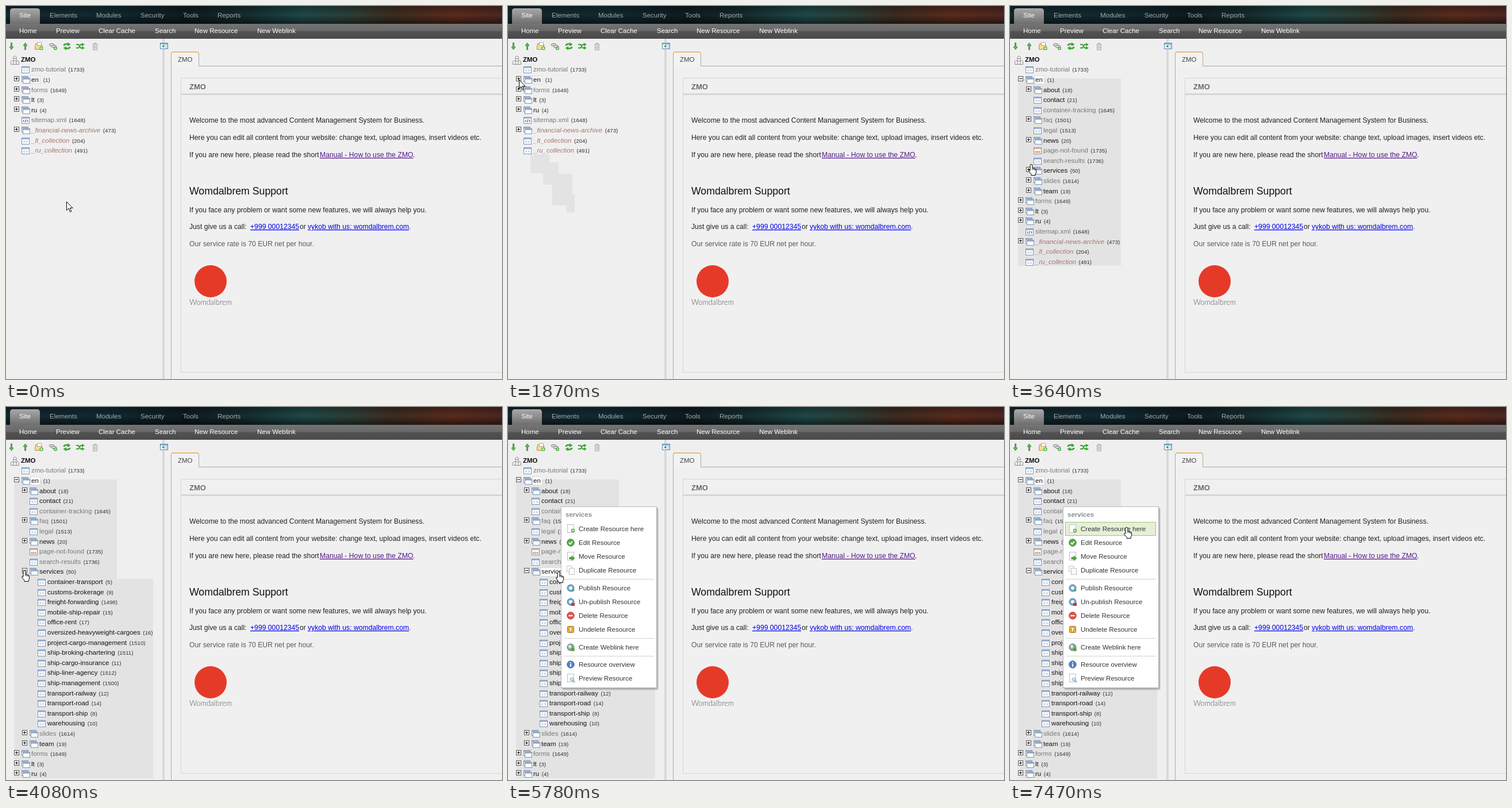
Recreate the animation shown at these times as an HTML page. Size 863 px wide and 649 px high, loop 8000 ms.

```html
<!DOCTYPE html>
<html lang="en">
<head>
<meta charset="utf-8">
<title>Site manager</title>
<style>
  html, body { margin: 0; width: 100%; height: 100%; overflow: hidden; background: #f0f0f0; }
  svg { display: block; font-family: "Liberation Sans", Arial, sans-serif; }
  text { white-space: pre; }
</style>
</head>
<body>
<svg id="stage" width="863" height="649" viewBox="0 0 863 649"></svg>
<script>
const LOOP = 8000, PITCH = 17.6, GHOST = '#e3e3e3';
const svg = document.getElementById('stage');

const rect = (x, y, w, h, fill, stroke = 'none', more = '') =>
  `<rect x="${x}" y="${y}" width="${w}" height="${h}" fill="${fill}" stroke="${stroke}" ${more}/>`;
const path = (d, fill = 'none', stroke = 'none', w = 1) =>
  `<path d="${d}" fill="${fill}" stroke="${stroke}" stroke-width="${w}"/>`;
const disc = (x, y, r, fill, stroke = 'none') =>
  `<circle cx="${x}" cy="${y}" r="${r}" fill="${fill}" stroke="${stroke}"/>`;
const text = (x, y, s, fill, size = 11.5, more = '') =>
  `<text x="${x}" y="${y}" fill="${fill}" font-size="${size}" ${more}>${s}</text>`;
const at = (x, y, s, id = '') => `<g ${id && `id="${id}"`} transform="translate(${x} ${y})">${s}</g>`;
const bold = 'font-weight="bold"';
const gradient = (id, dir, stops) => `<linearGradient id="${id}" x2="${dir === 'x' ? 1 : 0}" y2="${dir === 'y' ? 1 : 0}">` +
  stops.map(([o, c, a = 1]) => `<stop offset="${o}" stop-color="${c}" stop-opacity="${a}"/>`).join('') + '</linearGradient>';

// ---- Page frame ----
function header() {
  const tabs = { Elements: 76, Modules: 157, Security: 234, Tools: 308, Reports: 368 };
  const links = { Home: 23, Preview: 87, 'Clear Cache': 161, Search: 259, 'New Resource': 328, 'New Weblink': 437 };
  return '<defs>' +
    gradient('sky', 'x', [[0, '#14262d'], [.2, '#102a31'], [.36, '#0e1b20'], [.48, '#152c2e'], [.6, '#1f4848'],
      [.7, '#2d3d35'], [.78, '#3c2c20'], [.9, '#5a2b1c'], [1, '#4d2722']]) +
    gradient('dusk', 'y', [[0, '#000', .3], [.5, '#000', 0], [1, '#000', .5]]) +
    gradient('tab', 'y', [[0, '#a8a8a8'], [1, '#6f6f6f']]) +
    gradient('bar', 'y', [[0, '#747474'], [.46, '#686868'], [.52, '#525252'], [1, '#4a4a4a']]) +
    '</defs>' +
    rect(0, 0, 863, 31, 'url(#sky)') + rect(0, 0, 863, 31, 'url(#dusk)') +
    path('M7 31V9q0-5 5-5H54q5 0 5 5V31Z', 'url(#tab)') +
    rect(0, 31, 863, 26, 'url(#bar)') +
    text(23, 20, 'Site', '#fff') +
    Object.entries(tabs).map(([s, x]) => text(x, 20, s, '#a3a9ab')).join('') +
    Object.entries(links).map(([s, x]) => text(x, 47, s, '#fff')).join('');
}

function toolbar() {
  const green = '#3fa535', edge = '#2b7d25';
  const down = 'M3 0H5V7H7.5L4 12 .5 7H3Z';
  return at(5.5, 64, path(down, '#5cc04c', edge, .8)) +
    `<g transform="translate(29.5 76) scale(1 -1)">${path(down, '#5cc04c', edge, .8)}</g>` +
    at(50, 63, path('M1.5 5.5V2.5H6L7.5 4.5H12.5V12.5H.5V6Z', '#f4dc8c', '#b8943a') +
      rect(4.5, .5, 7, 5, '#fff', '#aaa') + disc(11.5, 10.5, 3.3, '#5db54a') +
      path('M11.5 8.5v4M9.5 10.5h4', 'none', '#fff', 1.2)) +
    at(75, 64, rect(.5, 1.5, 8, 4, '#ddd', '#777', 'rx="2"') + rect(4.5, 4.5, 8, 4, '#ddd', '#777', 'rx="2"') +
      disc(11, 9.5, 3, green) + path('M11 7.7v3.6M9.2 9.5h3.6', 'none', '#fff')) +
    at(99, 63, path('M1.5 6Q3 2 9 3.5M12.5 8Q11 12 5 10.5', 'none', green, 2.6) +
      path('M8 0L13.5 4 8 7ZM6 14L.5 10 6 7Z', green)) +
    at(122, 64, path('M0 3H4L8 9H11M0 9H4L8 3H11', 'none', green, 2.2) +
      path('M10 0L15 3 10 6ZM10 6L15 9 10 12Z', green)) +
    at(150, 63, path('M.5 3.5H9.5M3.5 3V1.5H6.5V3M1.5 3.5V13.5H8.5V3.5M3.8 5.5v6M6.2 5.5v6', '#e6e6e6', '#aaa'));
}

function mainArea() {
  const line = (y, s, fill = '#222') => text(319, y, s, fill, 12.2);
  const link = (x, y, s, fill = '#00e') => text(x, y, s, fill, 12.2, 'text-decoration="underline"');
  return rect(272, 57, 4, 592, '#d9d9d9') +
    at(268, 64, rect(.5, .5, 13, 10, '#fff', '#5b86bd') + rect(1, 1, 12, 2, '#8db3e0') +
      rect(9, 3, 4, 7, '#c8daf0') + path('M7.5 3L3 6 7.5 9Z', '#3fa535')) +
    path('M287.5 649V83q0-3 3-3H332.5q3 0 3 3V104.5H863', '#f2f2f2', '#aaa') +
    rect(288, 105, 575, 544, '#f0f0f0') +
    path('M288 82.5q0-2.5 3-2.5H332q3 0 3 2.5', 'none', '#f2b65c', 1.4) +
    text(299, 97, 'ZMO', '#444') +
    rect(304.5, 125.5, 600, 512, '#f0f0f0', '#d5d5d5') + rect(305, 152, 558, 3, '#d6d6d6') +
    text(319, 145, 'ZMO', '#6a6a6a', 13, bold) +
    line(203, 'Welcome to the most advanced Content Management System for Business.') +
    line(233, 'Here you can edit all content from your website: change text, upload images, insert videos etc.') +
    line(263, 'If you are new here, please read the short') +
    link(546, 263, 'Manual - How to use the ZMO', '#551a8b') + text(708, 263, '.', '#222', 12.2) +
    text(319, 328, 'Womdalbrem Support', '#111', 17.7) +
    line(359, 'If you face any problem or want some new features, we will always help you.') +
    line(388, 'Just give us a call:') + link(425, 388, '+999 00012345') + text(511, 388, 'or', '#222', 12.2) +
    link(525, 388, 'vykob with us: womdalbrem.com') + text(701, 388, '.', '#222', 12.2) +
    line(418, 'Our service rate is 70 EUR net per hour.', '#5a5a5a') +
    disc(356, 479, 28, '#e63a28') +
    text(319, 520, 'Womdalbrem', '#555', 12.8, 'font-family="Lato, sans-serif" font-weight="300"');
}

// ---- Resource tree: label, id, icon (p page, f folder, x xml, e error), tone ----
const parse = s => s.trim().split(/\s*\n\s*/).map(r => r.split(' '));
const ROOT = parse(`zmo-tutorial 1733 p g
  en 1 f k
  forms 1649 f g
  lt 3 f k
  ru 4 f k
  sitemap.xml 1648 x g
  _financial-news-archive 473 f r
  _lt_collection 204 p r
  _ru_collection 491 p r`);
const EN = parse(`about 18 f k
  contact 21 p k
  container-tracking 1645 p g
  faq 1501 f g
  legal 1513 p g
  news 20 f k
  page-not-found 1735 e g
  search-results 1736 p g
  services 50 f k
  slides 1614 f g
  team 19 f k`);
const SERVICES = parse(`container-transport 5 p k
  customs-brokerage 9 p k
  freight-forwarding 1498 p k
  mobile-ship-repair 15 p k
  office-rent 17 p k
  oversized-heavyweight-cargoes 16 p k
  project-cargo-management 1510 p k
  ship-broking-chartering 1511 p k
  ship-cargo-insurance 11 p k
  ship-liner-agency 1512 p k
  ship-management 1500 p k
  transport-railway 12 p k
  transport-road 14 p k
  transport-ship 8 p k
  warehousing 10 p k`);
const TONE = { k: '#151515', g: '#7a7a7a', r: '#a97770' };

const pane = (x, y, w, h, bar = '#9db8dd') =>
  rect(x + .5, y + .5, w, h, '#fbfcfe', '#8595ad') + rect(x + 1, y + 1, w - 1, 2, bar);
const ICON = {
  p: pane(0, 0, 13, 11) + path('M5.5 5.2L3.8 7 5.5 8.8M8.5 5.2L10.2 7 8.5 8.8', 'none', '#8d9db4'),
  x: pane(0, 0, 13, 11) + path('M4.5 5L2.8 7 4.5 9M9.5 5L11.2 7 9.5 9M7.8 4.5L6.2 9.5', 'none', '#334'),
  e: pane(0, 0, 13, 11, '#e6b98a') + text(1.8, 9.8, '404', '#d2691e', 6, bold),
  f: pane(0, -1, 11, 9) + pane(2, 2, 12, 9)
};
const toggle = open => rect(.5, .5, 8, 8, '#fff', '#555') +
  path(open ? 'M2 4.5h5' : 'M2 4.5h5M4.5 2v5', 'none', '#000');

function treeRow([label, id, icon, tone], i, level, open) {
  const x = 27 + 14 * (level - 1), y = Math.round(114.4 + PITCH * i);
  return (icon === 'f' ? at(x - 13, y - 10, toggle(open)) : '') + at(x, y - 9, ICON[icon]) +
    text(x + 17, y, `<tspan class="label">${label}</tspan><tspan dx="${label === 'en' ? 8 : 4.5}" font-size="9.7" ` +
      `font-style="normal" fill="#333">(${id})</tspan>`, TONE[tone], 11.5, tone === 'r' ? 'font-style="italic"' : '');
}

function tree(enOpen, services) {
  const rows = [];
  for (const a of ROOT) {
    const open = enOpen && a[0] === 'en';
    rows.push([a, 1, open]);
    if (open) for (const b of EN) {
      const inner = b[0] === 'services' ? services : [];
      rows.push([b, 2, inner.length > 0], ...inner.map(c => [c, 3]));
    }
  }
  return rows.map(([r, level, open], i) => treeRow(r, i, level, open)).join('');
}

// ---- Context menu ----
const sheet = rect(2.5, .5, 11, 14, '#fdfdfd', '#b9c0c8');
const globe = disc(8, 8, 6, '#6ea6dc', '#4b7db2') + path('M4 5Q8 2 9 6T5 10ZM10 9l3 1-3 3Z', '#7cb66a');
const MENU = [
  [216, 'Create Resource here', sheet + disc(12, 11, 3.2, '#58ad3f') + path('M12 9v4M10 11h4', 'none', '#fff')],
  [240, 'Edit Resource', disc(8, 8, 6.2, '#55aa44', '#3c8630') + path('M5 8l2.2 2.4L11 5.8', 'none', '#fff', 2)],
  [264, 'Move Resource', sheet + path('M6 9.5H10V7L15 11 10 15V12.5H6Z', '#4fa83c', '#357d28', .7)],
  [288, 'Duplicate Resource', rect(1.5, .5, 8, 10, '#fdfdfd', '#c2c8ce') + rect(5.5, 4.5, 9, 11, '#fdfdfd', '#b9c0c8')],
  [319, 'Publish Resource', globe + disc(8, 8, 3, '#eef4fb') + path('M11 9l4 3-4 3Z', '#4fa83c')],
  [343, 'Un-publish Resource', globe + disc(8, 8, 3, '#eef4fb') + rect(9, 10, 6, 5, '#d8322a')],
  [367, 'Delete Resource', disc(8, 8, 6.2, '#e2574c', '#b93a30') + rect(4.5, 7, 7, 2.2, '#fff')],
  [391, 'Undelete Resource', rect(2.5, 2.5, 11, 11, '#f0b040', '#a87820', 'rx="1"') + path('M8 4L12 8H9.5V12H6.5V8H4Z', '#fff6d8', '#a87820', .7)],
  [422, 'Create Weblink here', disc(8, 8, 6, '#88a898', '#5c7868') + path('M4 5Q8 2 9 6T5 10Z', '#dfe8e2') + disc(12, 12, 3, '#4fa83c')],
  [452, 'Resource overview', disc(8, 8, 6.2, '#4f86c6', '#3567a2') + path('M8 7v5M8 4v1.8', 'none', '#fff', 2)],
  [476, 'Preview Resource', sheet + disc(10, 10, 2.8, '#cfe4f5', '#8faac0') + path('M12 12l3 3', 'none', '#9a8a70', 1.6)]
];
const menu = () =>
  rect(95, 176, 167, 317, '#000', 'none', 'opacity=".1" rx="3"') +
  rect(94, 175, 167, 316, '#000', 'none', 'opacity=".16" rx="2"') +
  rect(92.5, 173.5, 166, 315, '#fff', '#b8b8b8') +
  text(100, 191, 'services', '#868c94', 11.5, bold) +
  [299.5, 402.5, 433.5].map(y => path(`M97 ${y}H254`, 'none', '#d2d2d2')).join('') +
  rect(96.5, 200.5, 157, 23, '#e6f0d8', '#9cc27c', 'id="pick"') +
  MENU.map(([y, s, icon]) => at(101, y - 12, icon) + text(123, y, s, '#333')).join('');

// ---- Pointer: stepped moves as [first, last, tip points] ----
const MOVES = [
  [0, 0, [[105, 340]]],
  [480, 1270, [[101, 328], [77, 292], [61, 272], [39, 252], [35, 222], [31, 192], [28, 166], [27, 150]]],
  [1390, 1870, [[26, 146], [24, 140], [22, 134], [20, 130], [19, 128]]],
  [2370, 3080, [[24, 134], [30, 144], [38, 158], [46, 172], [54, 188], [66, 203], [81, 229]]],
  [3200, 3850, [[72, 234], [62, 243], [52, 254], [43, 265], [37, 275], [33, 281], [32, 284]]],
  [4430, 5210, [[40, 284], [56, 282], [80, 280], [104, 279], [116, 279], [108, 282], [96, 285], [89, 286]]],
  [5330, 5330, [[88, 286]]],
  [6510, 7230, [[98, 282], [114, 272], [131, 261], [149, 250], [163, 239], [176, 228], [184, 218]]],
  [7340, 7470, [[194, 213], [203, 209]]]
];
const STEPS = MOVES.flatMap(([a, b, pts]) => pts.map(([x, y], i) =>
  ({ t: Math.floor((a + (b - a) * i / Math.max(1, pts.length - 1)) / 10) * 10, x, y })));

// Grey patches the pointer leaves behind below the tree
const trail = STEPS.slice(1, 5).map((s, i) => {
  const old = STEPS[i], top = Math.max(258, s.y);
  return rect(s.x, top, old.x + 11 - s.x, old.y + 19 - top, GHOST, 'none', `class="trail" data-t="${s.t}"`);
}).join('');

const ARROW = path('M.5 .5V15.5L4 12.2 6.6 18.3 8.8 17.3 6.2 11.5H11Z', '#fff', '#000');
const HAND = path('M5 .5Q7 .5 7 2.5V7Q9 6 9.5 7.7 11.3 7 11.8 8.6 13.6 8.4 13.6 10.4V14Q13.5 16 12.2 17V19.5H5V17.5' +
  'Q2.5 15 .8 12 .2 9.6 3.1 11V2.5Q3.1 .5 5 .5Z', '#fff', '#000') +
  path('M7 6.5V10M9.5 7.7V10.5M11.8 8.6V11', 'none', '#000');

svg.innerHTML = rect(0, 0, 863, 649, '#efefef') + header() + mainArea() + toolbar() +
  trail +
  `<g id="ghost1">${rect(14, 126, 179, 326, GHOST)}</g>` +
  `<g id="ghost2">${rect(14, 299, 179, 169, GHOST)}</g>` +
  `<g id="ghost3">${rect(14, 299, 242, 347, GHOST)}</g>` +
  rect(42.5, 121.5, 17, 14, '#f4f4f4', '#dcdcdc', 'id="current"') +
  rect(0, 0, 0, 15, '#fff', '#dcdcdc', 'id="hover"') +
  at(8, 86, path('M5 6V2.5Q7.5-.5 10 2.5V6M5 5.5H10V9.5H5ZM.5 15.5V10.5Q2.5 7.5 5 10.5V15.5ZM10 15.5V10.5Q12.5 7.5 14.5 10.5V15.5ZM5 15.5H10',
    '#f6f6f6', '#8a8a8a')) +
  text(26, 97, 'ZMO', '#111', 11.5, bold) +
  [tree(false, []), tree(true, []), tree(true, SERVICES.slice(-1)), tree(true, SERVICES)]
    .map(s => `<g class="tree">${s}</g>`).join('') +
  `<g id="menu">${menu()}</g>` + at(0, 0, ARROW, 'arrow') + at(0, 0, HAND, 'hand');

const $ = id => document.getElementById(id);
const trees = [...svg.querySelectorAll('.tree')], trails = [...svg.querySelectorAll('.trail')];
const spans = trees.map(g => [...g.querySelectorAll('.label')].map(l =>
  ({ x: +l.parentNode.getAttribute('x'), w: l.getComputedTextLength() })));
const show = (el, on) => el.style.display = on ? '' : 'none';
const place = (el, x, y) => el.setAttribute('transform', `translate(${x} ${y})`);

function draw(t) {
  const state = t < 2110 ? 0 : t < 3960 ? 1 : t < 4080 ? 2 : 3;
  const tip = STEPS.findLast(s => s.t <= t);
  const hand = t >= 1990, menuOn = t >= 5780;

  trees.forEach((g, i) => show(g, i === state));
  [1, 2, 3].forEach(i => show($('ghost' + i), i === 2 ? state === 2 : state >= i));
  trails.forEach(r => show(r, t >= +r.dataset.t));
  $('current').setAttribute('fill', t >= 2370 ? '#fff' : '#f4f4f4');

  const row = Math.round((tip.y - 110.4) / PITCH), span = spans[state][row];
  const over = hand && state && span && tip.x >= span.x - 2 && tip.x <= span.x + span.w + 2 && !(menuOn && tip.x > 92);
  show($('hover'), over);
  if (over) {
    $('hover').setAttribute('x', span.x - 1.5);
    $('hover').setAttribute('y', Math.round(103 + PITCH * row) + .5);
    $('hover').setAttribute('width', span.w + 4);
  }

  show($('menu'), menuOn);
  const item = tip.x > 92 && MENU.find(([y]) => tip.y >= y - 16 && tip.y < y + 8);
  show($('pick'), item);
  if (item) $('pick').setAttribute('y', item[0] - 15.5);

  show($('arrow'), !hand);
  show($('hand'), hand);
  place($('arrow'), tip.x, tip.y);
  place($('hand'), tip.x - 5, tip.y);
}

const start = performance.now();
(function tick() {
  draw((performance.now() - start) % LOOP);
  requestAnimationFrame(tick);
})();
</script>
</body>
</html>
```
